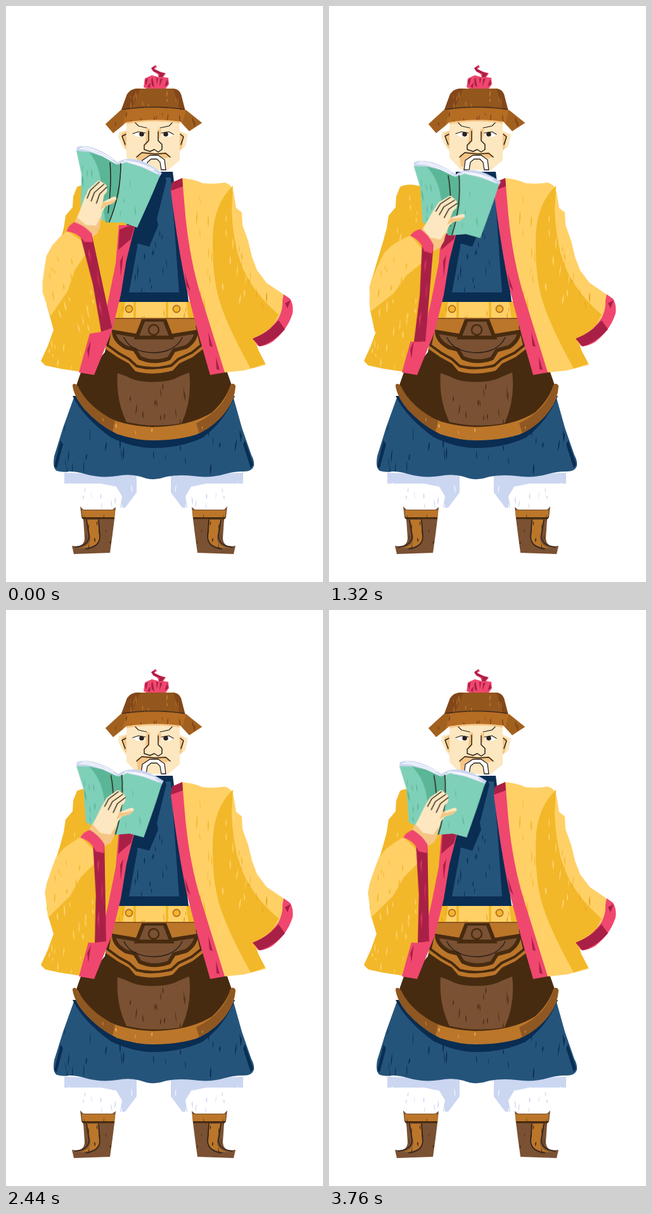
Animation, 500 px wide and 907 px high, one loop 3.8 s. Source, as an HTML page:

```html
<!DOCTYPE html>
<html lang="en">
<head>
<meta charset="utf-8">
<title>Reader in a yellow coat</title>
<style>
html, body { margin: 0; width: 100%; height: 100%; overflow: hidden; background: #fff; }
svg { display: block; width: 500px; height: 907px; }
.yd { fill: #f2b829 } .yl { fill: #ffd066 }
.pk { fill: #f0476f } .pd { fill: #a92046 }
.nv { fill: #0a2d52 } .bl { fill: #25547b }
.dk { fill: #472b10 } .md { fill: #7a5133 } .or { fill: #bb762a }
.sk { fill: #fce7c0 } .sh { fill: #f6c584 }
.lv { fill: #cbd6f1 } .wh { fill: #fff }
.ln { fill: none; stroke: #2a211b; stroke-width: 1.5; stroke-linejoin: round; stroke-linecap: round }
.arm, .hand, .book { animation: 3800ms infinite both }
.arm { transform-origin: 89px 467px; animation-name: arm }
.hand { transform-origin: 147px 360px; animation-name: hand }
.book { transform-origin: 111px 221px; animation-name: book }
@keyframes arm {
  0% { transform: rotate(-12.2deg) }
  12.1% { transform: rotate(-12.2deg); animation-timing-function: cubic-bezier(.33,0,.25,1) }
  41% { transform: rotate(5.4deg) }
  43.7% { transform: rotate(5.4deg); animation-timing-function: cubic-bezier(.4,0,.3,1) }
  56.3%, 100% { transform: rotate(-1deg) }
}
@keyframes hand {
  0% { transform: translate(1px,-4px) rotate(8deg) }
  12.1% { transform: translate(1px,-4px) rotate(8deg); animation-timing-function: cubic-bezier(.33,0,.25,1) }
  41% { transform: translate(1px,0px) rotate(0deg) }
  43.7% { transform: translate(1px,0px) rotate(0deg); animation-timing-function: cubic-bezier(.4,0,.3,1) }
  56.3%, 100% { transform: translate(1px,-7px) rotate(3deg) }
}
@keyframes book {
  0% { transform: translate(0px,0px) rotate(0deg) }
  12.1% { transform: translate(0px,0px) rotate(0deg); animation-timing-function: cubic-bezier(.33,0,.25,1) }
  41% { transform: translate(23px,25px) rotate(-4.5deg) }
  43.7% { transform: translate(23px,25px) rotate(-4.5deg); animation-timing-function: cubic-bezier(.4,0,.3,1) }
  56.3%, 100% { transform: translate(-.5px,18px) rotate(-5deg) }
}
</style>
</head>
<body>
<svg viewBox="0 0 500 907">
<defs>
  <path id="shirt" d="M203 261H263L288 466H170L185 380Z"/>
  <path id="skirt" d="M108 614L90 664L76 709Q73 728 80 732Q90 735 100 733Q112 733 125 737Q150 744 175 740Q195 736 212 741Q232 749 250 742Q270 737 295 740Q322 744 345 737Q360 733 372 733Q388 734 391 724Q392 716 387 707L372 664L358 614Z"/>
  <path id="coat" d="M265 278L277 271Q295 272 310 279Q330 281 345 278Q357 281 359 294L363 318L372 325L373 345L382 370L388 395L396 416L411 436L439 455L436 480L421 506L392 524L398 542L410 565L375 574L345 577L322 570Z"/>
  <path id="side" d="M112 285Q125 278 145 284L190 300V350L160 515L138 579L85 571L62 566L55 559L66 535L75 510L64 470L66 435L78 395L85 372L91 350L94 330L105 317L106 300Z"/>
  <path id="sleeve" d="M62 445L65 430L73 408L80 390L92 376L106 366L120 358L157 372V523L139 525L110 523L76 514L67 484Z"/>
  <path id="brim" d="M181 164Q232 157 284 164L309 184L289 197L275 182Q232 176 190 183L169 200L157 186Z"/>
  <path id="crown" d="M191 139Q196 131 206 130H264Q273 131 276 139L283 166Q232 158 181 166Z"/>
  <path id="cover" d="M111 228L131 230L152 237L165 246L175 250L190 246L214 254L243 267L230 298L207 349L185 341L163 341L140 332L118 317L119 265Z"/>
  <path id="trim" d="M105 597Q107 615 124 635Q146 659 175 674Q205 684 232 684Q270 684 300 675Q330 661 347 638Q362 618 362 598Q358 592 354 597Q347 620 325 640Q290 662 232 663Q180 661 150 642Q125 625 114 600Q108 592 105 597Z"/>
  <path id="panel" d="M176 578L192 584Q206 592 232 592Q258 592 272 584L289 577Q294 620 277 657Q232 665 190 655Q173 620 176 578Z"/>
  <path id="leg" d="M92 735L206 738V766L188 790H122L117 752H92Z"/>
  <path id="boot" d="M117 788L122 793H168L173 789L171 808L168 832L164 861L107 863L104 850Q123 854 124 838L122 808L119 805Z"/>
  <path id="belt" d="M178 465H293L300 493H168Z"/>
  <g id="foot">
    <path class="lv" d="M92 735L206 738V766L188 790H180L183 772L174 757L150 752H92Z"/>
    <g class="grain" data-clip="leg" data-spec="100 748 100 36 12 #fff 14"/>
    <g class="grain" data-clip="leg" data-spec="120 756 56 28 7 #cbd6f1 16"/>
    <use href="#boot" class="md"/>
    <path class="or" d="M119 794H172L171 806H121ZM128 809H145L147 839Q145 851 124 853L107 855Q134 853 133 836Z"/>
    <path class="dk" d="M119 805H171V808H121Z"/>
    <path class="ln" d="M127 809L131 835Q130 850 109 852M146 809L148 835Q148 852 126 855"/>
    <g class="grain" data-clip="boot" data-spec="122 794 48 56 10 #472b10 14"/>
  </g>
</defs>

<g id="legs">
  <use href="#foot"/>
  <use href="#foot" transform="matrix(-1 0 0 1 466 0)"/>
</g>

<use href="#skirt" class="bl"/>
<path class="nv" d="M105 614Q122 648 165 679Q200 696 232 696Q275 696 310 680Q345 654 361 614ZM76 725L86 684L90 690L80 728ZM390 722L377 684L374 690L386 728Z"/>
<g class="grain" data-clip="skirt" data-spec="86 655 292 68 26 #0a2d52 22"/>

<path class="dk" d="M130 560H335L349 577L357 600Q340 640 295 660Q232 674 175 660Q130 640 110 600L118 577Z"/>
<use href="#panel" class="md"/>
<g class="grain" data-clip="panel" data-spec="178 590 108 62 13 #472b10 22"/>
<use href="#trim" class="or"/>
<path d="M105 597Q107 615 124 635Q146 659 168 670L172 653Q130 632 114 600Q108 592 105 597ZM362 598Q360 620 347 638Q330 661 305 673L300 657Q345 635 354 597Q358 592 362 598Z" fill="#8f5721"/>
<g class="grain" data-clip="trim" data-spec="110 610 245 65 16 #f2b45d 12"/>

<path class="dk" d="M166 490H301L316 546L335 577H130L156 545Z"/>
<path class="or" d="M168 492H300L311 540L294 553L273 563L263 574Q232 583 204 575L194 563L176 553L157 540Z"/>
<path d="M166 503L160 534L178 547L194 556L206 567Q232 574 261 566L272 556L293 546L308 534L301 503" fill="none" stroke="#472b10" stroke-width="4"/>
<path d="M170 513Q171 528 190 538L203 541L211 554Q233 564 257 555L265 542L284 537Q299 527 300 513L263 519H205Z" fill="#7a5133" stroke="#472b10" stroke-width="6"/>
<path class="ln" stroke-width="2" d="M186 522Q197 545 233 546Q267 545 278 522"/>
<path d="M217 494H250L261 522H206Z" fill="#7a5133" stroke="#472b10" stroke-width="6"/>
<circle cx="233" cy="510" r="8" fill="#7a5133" stroke="#472b10" stroke-width="2.5"/>

<use href="#belt" class="yl"/>
<path class="yd" d="M178 465H188L184 493H168ZM201 465H205V493H201ZM252 465H256V493H252ZM284 465H293L300 493H288Z"/>
<g class="grain" data-clip="belt" data-spec="176 468 116 23 10 #e39d22 14"/>
<g fill="#f2b829" stroke="#b66b24" stroke-width="1.8"><circle cx="194" cy="477" r="5.5"/><circle cx="269" cy="477" r="5.5"/></g>
<path d="M168 492H300" stroke="#8f5721" stroke-width="2"/>

<use href="#shirt" class="nv"/>
<path class="bl" d="M205 270H260L273 451L194 451L207 380Z"/>
<path class="nv" d="M200 261H248L253 275L238 335L240 346L226 379L208 374L196 390Z"/>
<g class="grain" data-clip="shirt" data-spec="200 350 65 95 15 #0a2d52 20"/>

<use href="#coat" class="yl"/>
<path class="yd" d="M358 283L356 320Q357 365 370 404Q386 448 430 486L420 505L392 524L398 542L409 563L386 571Q352 510 339 471Q325 432 326 366Q327 312 358 283Z"/>
<g class="grain" data-clip="coat" data-spec="292 292 32 250 14 #f2b829 24"/>
<g class="grain" data-clip="coat" data-spec="332 315 50 200 16 #ffd678 24"/>
<g class="grain" data-clip="coat" data-spec="366 360 50 110 9 #e6a51c 20"/>
<path class="pk" d="M438 454L448 461Q454 471 452 484Q444 510 420 529Q404 538 397 535L390 523Q416 514 430 491Q437 478 436 464Z"/>
<path class="pd" d="M389 524Q402 519 417 508L430 495L440 509Q421 530 400 536ZM440 468L449 463L444 476Z"/>
<path class="pk" d="M260 291L262 278L278 271L283 330Q290 400 307 455L345 577L322 581L303 515L285 446Q271 380 260 291Z"/>
<path class="pd" d="M260 291L262 278L278 271L279 284ZM319 513L326 537L321 535ZM282 421L291 449L285 441ZM331 552L337 573L332 572Z"/>

<use href="#side" class="yd"/>
<g class="grain" data-clip="side" data-spec="66 520 58 46 9 #ffd678 18"/>
<g class="grain" data-clip="side" data-spec="106 295 34 65 6 #ffd678 18"/>
<path class="pk" d="M178 345H204L190 400L181 455L167 512L139 581L115 577L132 516L150 512L161 465L173 405Z"/>
<path class="pd" d="M179 352L204 342L197 367L177 384ZM180 402L185 392L181 426ZM128 541L134 527L130 555Z"/>

<g id="head">
  <path class="sk" d="M190 196L178 198L177 207L185 223L191 230ZM273 196L287 202L283 221L273 229Z"/>
  <path class="sh" d="M190 197L182 201L186 220L190 225ZM274 199L281 203L278 222L274 228Z"/>
  <path class="ln" d="M189 202L183 205L188 218M275 202L280 206L276 218"/>
  <path class="sk" d="M190 181H274V243L256 258H208L190 239Z"/>
  <path class="sh" d="M190 180Q232 173 274 180V185Q232 178 190 186ZM222 193H227L226 212L220 221V213ZM239 194H245L242 211ZM206 235L216 229L236 231L252 230L260 237L251 240L239 235H227L215 241L212 253H208Z"/>
  <path class="wh" d="M200 202L209 198L220 201L217 206L207 206ZM246 201L257 198L264 202L259 206L248 206Z"/>
  <ellipse cx="214" cy="202" rx="3.800" ry="3.400" fill="#2a211b"/><ellipse cx="252" cy="202" rx="3.800" ry="3.400" fill="#2a211b"/>
  <path class="ln" style="stroke-width:1.2" d="M204 184L209 189L222 192M262 184L257 189L243 192M200 201L209 198L220 200M245 200L257 198L264 202"/>
  <path class="ln" d="M225 197L225 212L218 219V226L227 229L234 226L240 230L246 226V218L240 212V198M206 238L214 231L235 233L252 232L259 238"/>
  <path class="wh" stroke="#2a211b" stroke-width="1.3" d="M213 258L215 243L227 235H240L250 242L252 258H245L243 246L238 241H229L223 246L221 258Z"/>
  <path class="pk" d="M217 128L219 114L230 109L241 112L239 107L232 103L229 98L236 93L238 96L234 99L242 103L252 106L248 112L256 113L257 123L252 130H222Z"/>
  <path class="pd" d="M229 98L236 93L233 99L245 105L251 106L246 112H241L242 107L233 103ZM219 117L224 113L221 126ZM229 116L231 112L234 128L230 125ZM243 115L247 114L242 127ZM254 115L256 123L250 127ZM223 127L228 120L227 129ZM237 113L240 114L238 124Z"/>
  <use href="#crown" fill="#93561d"/>
  <path d="M191 139Q196 131 206 130H212L198 162L181 166ZM264 130Q273 131 276 139L283 166L274 164Z" fill="#824719"/>
  <g class="grain" data-clip="crown" data-spec="196 132 76 25 11 #bb762a 15"/>
  <path class="ln" style="stroke-width:1.1" d="M183 163Q232 155 282 163"/>
  <use href="#brim" fill="#b56c23"/>
  <path d="M157 186L181 164L190 163L184 188L169 200ZM284 164L309 184L289 197L278 185Z" fill="#a2601f"/>
  <g class="grain" data-clip="brim" data-spec="168 166 130 20 15 #794318 16"/>
</g>

<g class="book">
  <path class="lv" d="M111 228L112 222Q122 218 142 225Q160 232 176 246Q188 238 207 242Q225 246 246 263L241 271L214 262L189 251L174 256L150 242L129 235Z"/>
  <path d="M116 224Q143 227 173 248M179 248Q202 242 239 264M121 222Q145 226 169 242M186 244Q205 244 234 258" fill="none" stroke="#fff" stroke-width="1.4"/>
  <use href="#cover" fill="#7fd0b8"/>
  <path d="M131 230L152 237L175 250L182 248L179 295L163 341H157L150 296Q152 256 131 230Z" fill="#5bb697"/>
  <g class="grain" data-clip="cover" data-spec="120 245 112 88 18 #58b496 22"/>
  <path class="ln" d="M164 247Q167 278 161 326M181 248Q181 296 163 340"/>
</g>

<g class="arm">
  <g class="hand">
    <path class="sk" d="M131 357L141 338L151 316L158 303L174 291Q178 290 179 293L184 296Q188 299 187 303Q189 309 182 314L179 325L196 318Q202 317 201 322L195 328L183 332L177 340L174 352L167 373L151 383Z"/>
    <path class="sh" d="M131 357L137 346L150 359L166 361L174 347L172 363L167 373L151 383ZM179 325L174 337L184 331L195 328L201 322L185 326Z"/>
    <path class="ln" d="M155 317L161 305L176 293M161 322L167 309L183 297M169 326L175 312L187 302"/>
  </g>
  <use href="#sleeve" class="yd"/>
  <path class="yl" d="M62 445L65 430L73 408L80 390L92 376L106 366L120 358L140 379V401L119 421L101 451L66 484Z"/>
  <g class="grain" data-clip="sleeve" data-spec="74 390 60 68 11 #f2b829 22"/>
  <g class="grain" data-clip="sleeve" data-spec="80 450 58 60 11 #ffd678 22"/>
  <path class="pd" d="M139 374L157 370V523L139 525L142 450Z"/>
  <path class="pk" d="M119 359Q124 350 134 347Q148 355 157 370L156 384L143 381Q136 364 119 359Z"/>
  <path d="M145 401L148 393L147 416ZM151 442L153 429L152 459ZM144 486L147 475L146 504Z" fill="#d93660"/>
</g>
</svg>
<script>
const NS = 'http://www.w3.org/2000/svg';
const defs = document.querySelector('defs');
let seed = 41;
const rnd = () => (seed = (seed * 16807) % 2147483647) / 2147483647;

function add(parent, tag, attrs) {
  const el = document.createElementNS(NS, tag);
  for (const k in attrs) el.setAttribute(k, attrs[k]);
  parent.appendChild(el);
  return el;
}

function clipTo(el, id) {
  const clip = 'clip-' + id;
  if (!document.getElementById(clip)) {
    const c = add(defs, 'clipPath', { id: clip });
    add(c, 'use', { href: '#' + id });
  }
  el.setAttribute('clip-path', `url(#${clip})`);
}

// Tapered wood-cut marks scattered in a box and clipped to a shape.
function grain(g) {
  const [x, y, w, h, n, color, len] = g.dataset.spec.split(' ');
  let d = '';
  for (let i = 0; i < n; i++) {
    const px = +x + rnd() * w, py = +y + (i + rnd()) / n * h;
    const l = len * (.4 + rnd() * .6), tilt = (rnd() - .5) * l * .3;
    const wide = .8 + rnd() * 1.5;
    d += `M${px} ${py}q${wide + tilt / 2} ${l / 2} ${tilt} ${l}q${-wide - tilt / 2} ${-l / 2} ${-tilt} ${-l}Z`;
  }
  add(g, 'path', { d, fill: color });
  clipTo(g, g.dataset.clip);
}

document.querySelectorAll('.grain').forEach(grain);
</script>
</body>
</html>
```
